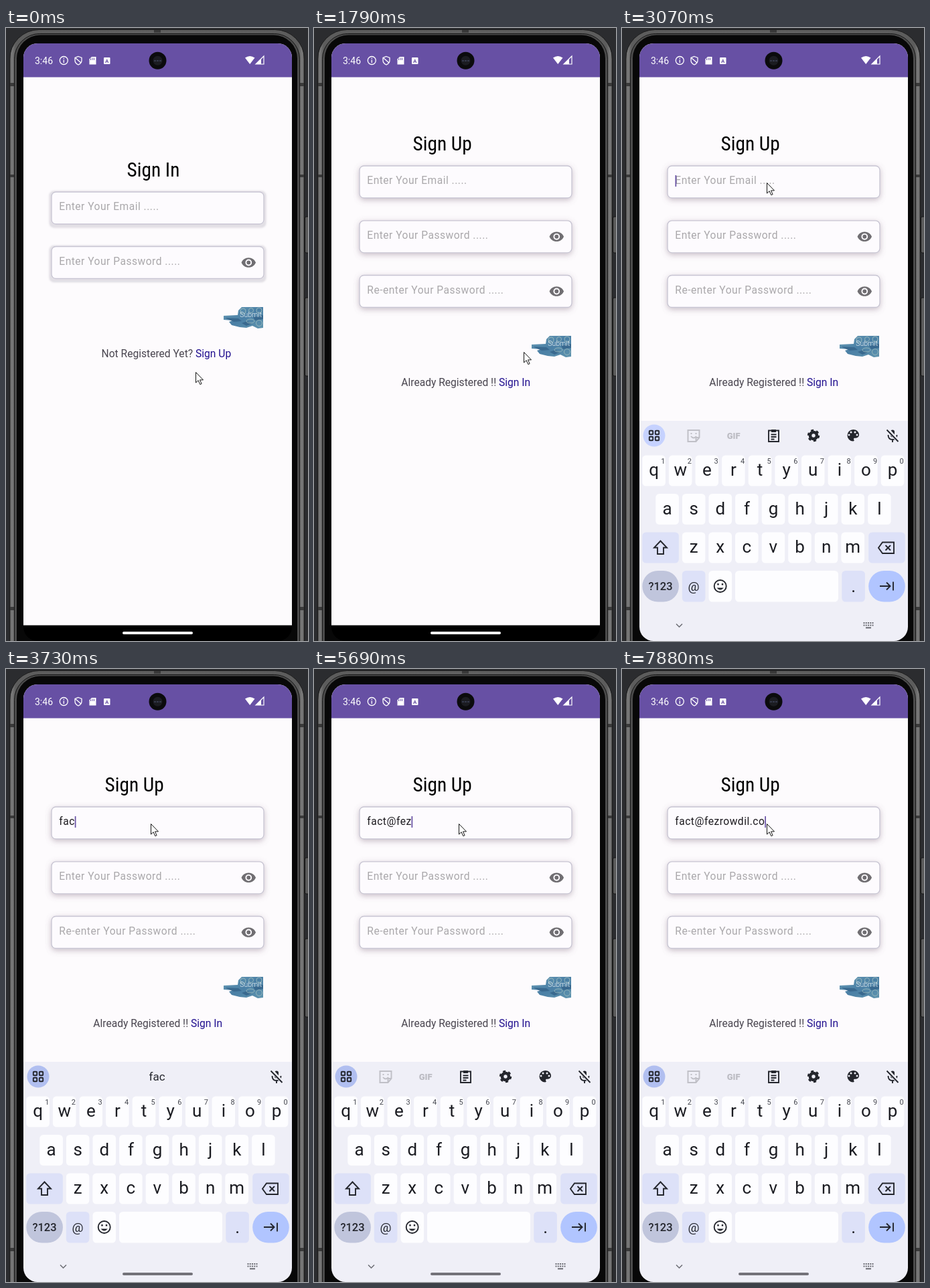
Write an HTML page that moves like this. It is 451 by 916 pixels and loops after 8 s.

```html
<!DOCTYPE html>
<html lang="en">
<head>
<meta charset="utf-8">
<title>Sign up flow</title>
<style>
  html, body { margin: 0; width: 100%; height: 100%; overflow: hidden; background: #2b2c2f; }
  svg { display: block; width: 451px; height: 916px; }
  text { font-family: Roboto, Arial, sans-serif; white-space: pre; }
  .title { font: 400 29.3px "Roboto Condensed", Roboto, sans-serif; font-stretch: 75%; text-anchor: middle; }
  .body { font-size: 15.6px; fill: #49454f; }
  .link { fill: #21108f; }
  .input { font-size: 15.6px; letter-spacing: .49px; fill: #1d1b20; }
  .hint { fill: #aaa8ab; }
  .key { font-size: 26px; text-anchor: middle; fill: #1b1c22; }
  .digit { font-size: 11px; text-anchor: middle; fill: #44464f; }
  .mid { text-anchor: middle; }
  .line { fill: none; stroke: #24262d; stroke-width: 1.9; }
</style>
</head>
<body>
<svg viewBox="0 0 451 916">
  <defs>
    <linearGradient id="metal" x2="1" y2="0">
      <stop offset="0" stop-color="#4a4a4a"/><stop offset=".007" stop-color="#7c7c7c"/>
      <stop offset=".02" stop-color="#5c5c5c"/><stop offset=".5" stop-color="#606060"/>
      <stop offset=".98" stop-color="#5c5c5c"/><stop offset=".993" stop-color="#7c7c7c"/>
      <stop offset="1" stop-color="#4a4a4a"/>
    </linearGradient>
    <linearGradient id="paint" x2="1" y2="1">
      <stop offset="0" stop-color="#6c9fb8"/><stop offset=".5" stop-color="#4a7fa5"/><stop offset="1" stop-color="#5f94ae"/>
    </linearGradient>
    <filter id="firm" x="-10%" y="-40%" width="120%" height="190%">
      <feMorphology in="SourceAlpha" operator="dilate" radius="3"/>
      <feOffset dy="2"/>
      <feGaussianBlur stdDeviation=".8" result="spread"/>
      <feFlood flood-color="#5c5770" flood-opacity=".17"/>
      <feComposite in2="spread" operator="in" result="shade"/>
      <feMerge><feMergeNode in="shade"/><feMergeNode in="SourceGraphic"/></feMerge>
    </filter>
    <filter id="soft" x="-10%" y="-40%" width="120%" height="190%">
      <feDropShadow dx="0" dy="2.5" stdDeviation="4.4" flood-color="#74596f" flood-opacity=".38"/>
    </filter>
    <clipPath id="screen"><rect x="26" y="23" width="401" height="893" rx="21"/></clipPath>
    <path id="eye" fill="#706e72" transform="scale(.976) translate(-12 -12)" fill-rule="evenodd"
      d="M12 4.5C7 4.5 2.73 7.61 1 12c1.73 4.39 6 7.5 11 7.5s9.27-3.11 11-7.5c-1.73-4.39-6-7.5-11-7.5zM12 17a5 5 0 1 1 0-10 5 5 0 0 1 0 10zm0-8a3 3 0 1 0 0 6 3 3 0 0 0 0-6z"/>
    <g id="submit">
      <path fill="url(#paint)" d="M0 13l21-1 1-7 5-5h32v31l-8 1-8-4-9 3-10-1-12-3-4-5 6-2-14-1z"/>
      <path fill="#39698f" d="M2 16l20 1 5 4-12 1zM27 24l8-3 7 4-8 3zM44 15l15-3v6l-12 2z"/>
      <g fill="none" stroke="#93b5bb">
        <circle cx="29" cy="6" r="4"/><circle cx="41" cy="5" r="3.5"/><circle cx="53" cy="5" r="4"/>
        <ellipse cx="40" cy="21" rx="6" ry="3"/><circle cx="53" cy="24" r="4.5"/>
      </g>
      <text x="24.3" y="15" font-size="10.5" font-weight="300" fill="#f4f8fa">Submit</text>
    </g>
  </defs>

  <rect width="451" height="916" fill="#2b2c2f"/>
  <g fill="#5a5a5a" stroke="#151515">
    <rect x="446.5" y="282" width="6" height="54" rx="2"/>
    <rect x="446.5" y="403" width="6" height="117" rx="2"/>
  </g>
  <rect x="5.5" y="2.5" width="440" height="980" rx="44" fill="url(#metal)" stroke="#1a1a1a"/>
  <path d="M221 3h10v4h-10zM6 82h7v5H6zM438 82h7v5h-7zM6 219h7v4H6zM438 219h7v4h-7zM6 865h7v5H6zM438 865h7v5h-7z" fill="#3a3a3a"/>
  <rect x="12.5" y="8.5" width="426" height="980" rx="38" fill="#4c4c4c" stroke="#151515"/>
  <rect x="16" y="10.5" width="419" height="980" rx="35" fill="#080808"/>

  <g clip-path="url(#screen)">
    <rect x="26" y="23" width="401" height="870" fill="#fdfbfd"/>
    <rect x="26" y="892.5" width="401" height="24" fill="#000"/>
    <rect x="174" y="902" width="105" height="4" rx="2" fill="#fff"/>
    <rect x="26" y="23" width="401" height="50.5" fill="#6750a4"/>
    <g fill="#fff">
      <text x="43" y="54" font-size="14">3:46</text>
      <g fill="none" stroke="#fff" stroke-width="1.3">
        <circle cx="86.3" cy="48.5" r="6"/>
        <path d="M86.3 47.5v4.5M86.3 44.8v1.5"/>
        <path d="M108 42.5l5 2v4q0 4-5 6.5-5-2.5-5-6.5v-4zM104 45l8 7"/>
      </g>
      <path d="M128 43h6.5v11.5h-10v-8z"/>
      <rect x="146" y="44" width="9.5" height="10" rx="1"/>
      <path d="M357 44.5q7.2-5 14.5 0L364.2 54z"/>
      <path d="M373 54L385 42v12z" fill="none" stroke="#fff" stroke-width="1.2"/>
      <path d="M373 54l8-8v8z"/>
    </g>
    <path d="M126.5 45.5V48M129 44.5V48M131.5 44.5V48" stroke="#6750a4"/>
    <text x="150.7" y="52" font-size="8" font-weight="700" class="mid" fill="#6750a4">A</text>
    <circle cx="226.5" cy="48.8" r="13" fill="#0b0b0d"/>
    <circle cx="226.5" cy="48.8" r="7" fill="#1b1c21"/>
    <path d="M221 49h11" stroke="#34384a" stroke-width="2" stroke-dasharray="3 1"/>

    <g id="signIn"></g>
    <g id="signUp"></g>
    <g id="keyboard"></g>
  </g>
  <path id="pointer" d="M.5.5V16l3.6-3.4 2.7 6 2.3-1-2.6-5.7h5z" fill="#fff" stroke="#151515" stroke-linejoin="round"/>
</svg>

<script>
const LOOP = 8000;
const ADDRESS = 'fact@fezrowdil.co';
// Time at which each further character is in place.
const TYPED = [3330, 3600, 3730, 4030, 4670, 5400, 5400, 5690, 5990,
               6610, 6880, 7010, 7150, 7280, 7580, 7730, 7880];
const CARET_OFF = [[4550, 4670], [5100, 5400], [6460, 6610]];

const $ = id => document.getElementById(id);
const show = (el, on) => el.setAttribute('visibility', on ? 'inherit' : 'hidden');
const within = (t, a, b) => t >= a && t < b;

const text = (x, y, cls, str, extra = '') => `<text x="${x}" y="${y}" class="${cls}" ${extra}>${str}</text>`;
const box = (x, y, w, h, r, fill) => `<rect x="${x}" y="${y}" width="${w}" height="${h}" rx="${r}" fill="${fill}"/>`;

function field(y, hint, shadow, eye, id = '') {
  return `<rect x="68" y="${y}" width="317" height="48" rx="6.5" fill="#fdfbfe" stroke="#c7c4d2" stroke-width="1.3" filter="url(#${shadow})"/>`
    + text(79.3, y + 27.3, 'input hint', hint, id && `id="${id}"`)
    + (eye ? `<use href="#eye" transform="translate(362.3 ${y + 24})"/>` : '');
}

function footer(x, y, ask, link) {
  return `<use href="#submit" transform="translate(325 ${y - 75})"/>`
    + text(x, y, 'body', `${ask} <tspan class="link">${link}</tspan>`);
}

$('signIn').innerHTML = text(220, 222, 'title', 'Sign In')
  + field(245, 'Enter Your Email .....', 'firm')
  + field(326.5, 'Enter Your Password .....', 'firm', true)
  + footer(142.6, 492, 'Not Registered Yet?', 'Sign Up');

$('signUp').innerHTML = text(191.7, 183, 'title', 'Sign Up')
  + field(206, 'Enter Your Email .....', 'soft', false, 'hint')
  + field(287.8, 'Enter Your Password .....', 'soft', true)
  + field(369.5, 'Re-enter Your Password .....', 'soft', true)
  + text(79.3, 233.3, 'input', '', 'id="typed"')
  + '<rect id="caret" y="220" width="1.7" height="17" fill="#6750a4"/>'
  + footer(130.3, 535, 'Already Registered !!', 'Sign In');

const PITCH = 39.6, TINT = '#dde1f8';

function keyRow(letters, x, y, digits = '') {
  return [...letters].map((c, i) => {
    const left = x + i * PITCH;
    return box(left, y, 34.6, 46, 5.5, '#fdfdff')
      + text(left + 17.3, y + 30.5, 'key', c)
      + (digits ? text(left + 31, y + 12.5, 'digit', digits[i]) : '');
  }).join('');
}

const tools = `
  <g fill="none" stroke="#c0c0c7" stroke-width="2">
    <path d="M98.5 601h17v11l-5 6h-12zM115.5 612h-5v6"/>
    <path d="M103 610q4 5 8 0M103.5 605v2M110.5 605v2"/>
  </g>
  ${text(166.7, 613.5, 'mid', 'GIF', 'font-size="13" font-weight="900" fill="#bcbcc3"')}
  <g class="line">
    <path d="M219 601.5h15v16.5h-15zM222.5 607.5h8M222.5 611h8M222.5 614.5h5"/>
    <path d="M223 602h7" stroke-width="4"/>
    <circle cx="286" cy="609" r="5" style="stroke-width:4.6"/>
    <circle cx="286" cy="609" r="7.8" style="stroke-width:2.8" stroke-dasharray="4.08"/>
  </g>
  <path transform="translate(333.5 597) scale(.98)" fill="#24262d" d="M12 3a9 9 0 0 0 0 18c.83 0 1.5-.67 1.5-1.5 0-.4-.15-.74-.4-1-.23-.27-.37-.62-.37-1 0-.83.67-1.5 1.5-1.5H16a5 5 0 0 0 5-5c0-4.42-4.03-8-9-8z"/>
  <g fill="#efeff7"><circle cx="339" cy="608" r="1.5"/><circle cx="342" cy="604" r="1.5"/><circle cx="348" cy="604" r="1.5"/><circle cx="351" cy="608" r="1.5"/></g>`;

const gridIcon = [0, 9].map(dx => [0, 9].map(dy =>
  `<rect x="${40.8 + dx}" y="${601.8 + dy}" width="5.4" height="5.4" rx="1" class="line"/>`).join('')).join('');

$('keyboard').innerHTML = box(26, 587, 401, 500, 0, '#efeff7')
  + '<circle id="badge" cx="48" cy="609" r="16.5"/>' + gridIcon
  + `<g id="tools">${tools}</g>`
  + text(225.5, 615, 'mid', '', 'id="guess" font-size="17" fill="#24262d"')
  + `<g class="line">
      <rect x="401" y="600.5" width="6" height="11" rx="3" fill="#24262d" stroke="none"/>
      <path d="M397.5 608q0 7 6.5 7t6.5-7M404 615v4"/>
      <path d="M397 600l16 18" style="stroke:#efeff7;stroke-width:5"/><path d="M395.5 600.5l17 17.5"/>
    </g>`
  + keyRow('qwertyuiop', 30.3, 638.5, '1234567890')
  + keyRow('asdfghjkl', 50.3, 696)
  + keyRow('zxcvbnm', 89.8, 753.5)
  + box(30.3, 753.5, 54.6, 46, 5.5, TINT) + box(368.2, 753.5, 54.6, 46, 5.5, TINT)
  + box(30.3, 811, 54.6, 46.5, 23, '#c0c5dc') + box(89.8, 811, 34.6, 46.5, 5.5, TINT)
  + box(129.5, 811, 34.6, 46.5, 5.5, '#fdfdff') + box(169, 811, 154, 46.5, 5.5, '#fdfdff')
  + box(328.3, 811, 34.6, 46.5, 5.5, TINT) + box(368.2, 811, 54.6, 46.5, 23, '#b1c5ff')
  + text(57.5, 840, 'mid', '?123', 'font-size="16.5" font-weight="500" fill="#24262d"')
  + text(107, 841, 'mid', '@', 'font-size="19" fill="#24262d"')
  + text(345.6, 843, 'key', '.')
  + `<g class="line">
      <path d="M57.5 766.5l-9.5 10h5v9.5h9v-9.5h5z"/>
      <path d="M389 768.5h17V785h-17l-6-8.2zM393.5 773l7.5 7.5M401 773l-7.5 7.5"/>
      <circle cx="146.7" cy="834" r="9"/><path d="M141.5 836.5q5.2 6 10.4 0z" fill="#24262d" stroke="none"/>
      <path d="M143.5 830v2.5M150 830v2.5" style="stroke-width:2.4"/>
      <path d="M385 834h15M395 828.5l5.5 5.5-5.5 5.5M405 827.5v13"/>
    </g>
    <g fill="none" stroke="#6c6d74" stroke-width="1.5">
      <path d="M81 890.5l4.5 4.5 4.5-4.5"/>
      <path d="M360.5 889h15M360.5 892.5h15" stroke-width="2" stroke-dasharray="2 1.25"/><path d="M364 896.3h8" stroke-width="2"/>
    </g>`
  + '<rect id="pill" x="174" y="902" width="105" height="4" rx="2" fill="#737279"/>';

// Pointer travel in held steps, arching upwards by `lift`.
function glide(t, start, end, steps, from, to, lift) {
  const k = Math.min(steps, Math.floor((t - start) / (end - start) * (steps - 1) + 1e-6) + 1);
  const s = k / steps, e = s * s * (3 - 2 * s);
  return [from[0] + (to[0] - from[0]) * e, from[1] + (to[1] - from[1]) * e - lift * Math.sin(Math.PI * e)];
}

function pointerAt(t) {
  if (t < 120) return [283, 514];
  if (t < 550) return [256, 484];
  if (t < 2100) return glide(t, 550, 1520, 8, [256, 484], [313, 484], 17);
  return glide(t, 2100, 2640, 5, [313, 484], [216, 231], 0);
}

let lastCount = -1;
function draw(t) {
  const count = TYPED.filter(at => t >= at).length;
  const up = t >= 1790;
  if (count !== lastCount) {
    $('typed').textContent = ADDRESS.slice(0, count);
    $('caret').setAttribute('x', 79.5 + (count ? $('typed').getComputedTextLength() - .3 : 0));
    $('guess').textContent = count < 5 ? ADDRESS.slice(0, count) : '';
    lastCount = count;
  }
  show($('signIn'), !up);
  show($('signUp'), up);
  show($('hint'), up && !count);
  $('hint').style.fill = within(t, 2800, 2920) ? '#7b797c' : '';
  show($('caret'), t >= 2800 && !CARET_OFF.some(([a, b]) => within(t, a, b)));

  show($('keyboard'), t >= 2920);
  $('keyboard').setAttribute('transform', `translate(0 ${t < 3070 ? 120 : 0})`);
  show($('tools'), t >= 2920 && (count < 1 || count > 4));
  show($('pill'), t >= 3190);
  $('badge').setAttribute('fill', t < 3190 ? '#c6d2ff' : '#b1bff0');

  $('pointer').setAttribute('transform', `translate(${pointerAt(t).map(Math.round)})`);
}

const start = performance.now();
function tick() {
  draw((performance.now() - start) % LOOP);
  requestAnimationFrame(tick);
}
tick();
</script>
</body>
</html>
```
